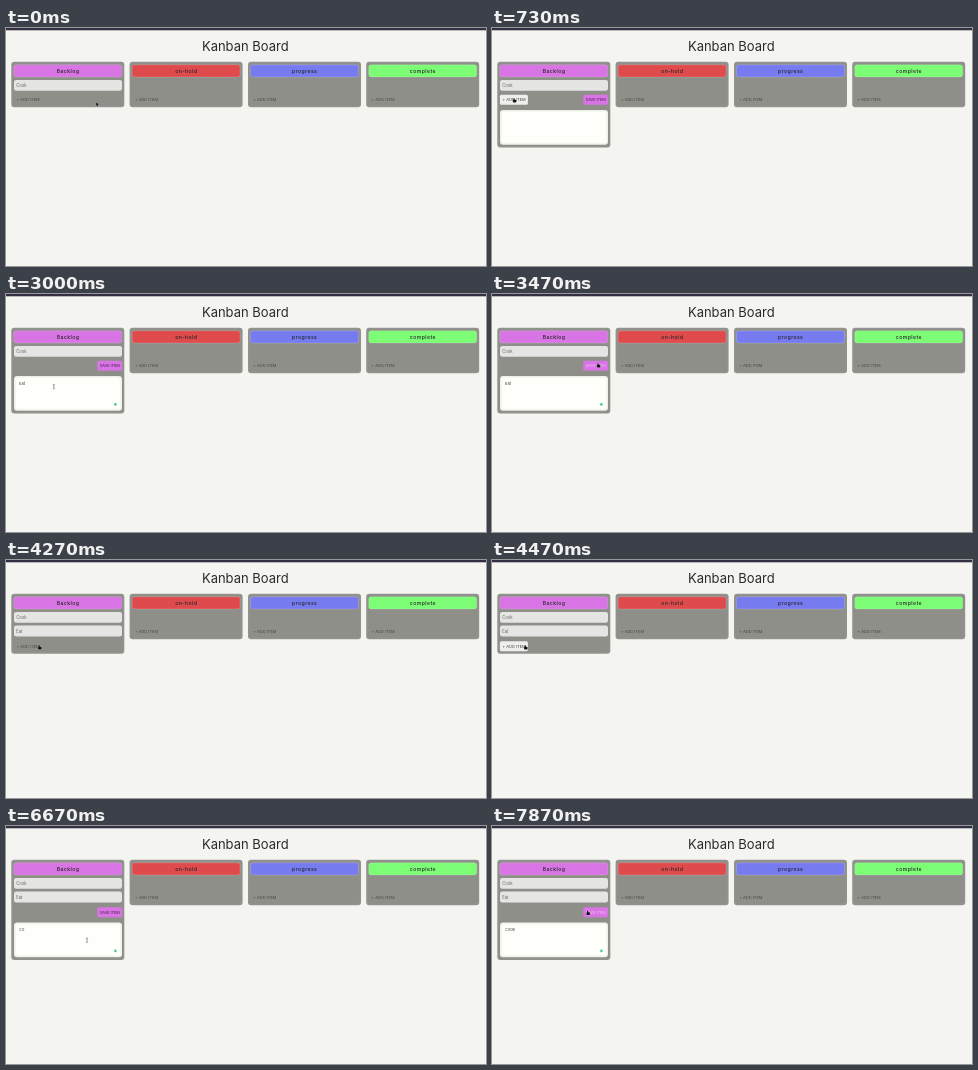
Recreate the animation shown at these times as an HTML page with a canvas. Size 480x238 px, loop 8000 ms.

```html
<!DOCTYPE html>
<html lang="en">
<head>
<meta charset="utf-8">
<title>Kanban Board</title>
<style>
  html, body { margin: 0; width: 100%; height: 100%; overflow: hidden; background: #f4f5f0; }
  canvas { display: block; }
</style>
</head>
<body>
<canvas id="stage" width="480" height="238"></canvas>
<script>
const ctx = document.getElementById('stage').getContext('2d');
const LOOP = 8000;
const VIOLET = '#d974e4';
const columns = [
  { x: 5.3, name: 'Backlog', color: VIOLET },
  { x: 123.6, name: 'on-hold', color: '#df4b4c' },
  { x: 242, name: 'progress', color: '#777bf0' },
  { x: 360.2, name: 'complete', color: '#7dfc76' }
];

// Cursor stops: time, x, y; the pointer eases between neighbours.
const path = [
  [70, 90.2, 74.2], [430, 22, 71], [900, 22, 71], [1200, 47, 93],
  [2980, 47, 93], [3270, 106, 70], [3900, 106, 70], [4200, 33.2, 86],
  [5130, 33.2, 86], [5200, 72, 104], [5270, 72, 104], [5530, 81, 114],
  [7320, 81, 114], [7740, 95.6, 85.5]
];
const typing = [
  { text: 'Eat', keys: [1870, 2130, 2400] },
  { text: 'Code', keys: [5800, 6600, 6700, 6800] }
];

const clamp = v => Math.max(0, Math.min(1, v));
const ramp = (t, from, to) => clamp((t - from) / (to - from));
const ease = v => v * v * (3 - 2 * v);
const within = (t, from, to) => t >= from && t < to;

function box(x, y, w, h, r, fill) {
  ctx.beginPath();
  ctx.roundRect(x, y, w, h, r);
  ctx.fillStyle = fill;
  ctx.fill();
}

function label(text, x, y, size, color, align = 'left', weight = 400, spacing = 0) {
  ctx.font = `${weight} ${size}px Inter, sans-serif`;
  ctx.letterSpacing = spacing + 'px';
  ctx.textAlign = align;
  ctx.textBaseline = 'alphabetic';
  ctx.fillStyle = color;
  ctx.fillText(text, x, y);
}

function item(text, y) {
  box(8, y, 108, 10.8, 2.2, '#e5e5e3');
  label(text, 10.2, y + 6.9, 4.2, '#666664');
}

function addButton(x, y, hover = 0, alpha = 1) {
  ctx.globalAlpha = alpha * hover;
  box(x + 2.6, y - 5, 28, 10, 1.5, '#eeeeec');
  ctx.globalAlpha = alpha;
  label('+ ADD ITEM', x + 5.3, y + 1.4, 4, '#484846');
  ctx.globalAlpha = 1;
}

function saveButton(y, hover) {
  box(91.3, y - 5, 24.8, 10, 1.5, VIOLET);
  const mix = (a, b) => Math.round(a + (b - a) * hover);
  label('SAVE ITEM', 103.7, y + 1.4, 3.8, `rgb(${mix(70, 240)},${mix(30, 190)},${mix(76, 244)})`, 'center');
}

function editor(y, text, badge) {
  box(8, y, 108, 34.8, 3, '#f0f0eb');
  box(9, y + 1, 106, 32.8, 3, '#f7f7f2');
  box(10, y + 2, 104, 30.8, 2.5, '#fefefa');
  label(text, 13, y + 8.8, 4, '#444442');
  if (badge) {
    ctx.beginPath();
    ctx.arc(109.4, y + 28.4, 1.3, 0, Math.PI * 2);
    ctx.fillStyle = '#3bcf91';
    ctx.fill();
  }
}

function column({ x, name, color }, height) {
  box(x, 33.8, 113, height, 3, '#92928f');
  box(x + 1.5, 35.3, 110, height - 3, 2.5, '#8f8f8a');
  box(x + 2.5, 36.8, 108, 12.2, 2.5, color);
  ctx.strokeStyle = 'rgba(255,255,255,.22)';
  ctx.lineWidth = .7;
  ctx.stroke();
  label(name, x + 56.7, 44.7, 5.2, '#252527', 'center', 500, .4);
}

function cursorAt(t) {
  const next = path.findIndex(stop => stop[0] > t);
  if (next === 0) return path[0].slice(1);
  if (next < 0) return path[path.length - 1].slice(1);
  const [t0, x0, y0] = path[next - 1];
  const [t1, x1, y1] = path[next];
  const k = ease(ramp(t, t0, t1));
  return [x0 + (x1 - x0) * k, y0 + (y1 - y0) * k];
}

function cursor(t) {
  const [x, y] = cursorAt(t);
  const overText = within(t, 1130, 3050) || within(t, 5270, 7450);
  const overButton = within(t, 370, 960) || within(t, 3200, 3670) ||
    within(t, 4170, 5190) || t >= 7700;
  ctx.save();
  ctx.translate(x, y);
  if (overText) {
    ctx.fillStyle = '#777';
    ctx.fillRect(-.4, -2, .8, 4.2);
    ctx.fillRect(-1.1, -2.2, 2.2, .5);
    ctx.fillRect(-1.1, 2, 2.2, .5);
  } else {
    ctx.beginPath();
    if (overButton) {
      ctx.roundRect(-.6, -.7, 1.3, 3, .6);
      ctx.roundRect(-1.2, .8, 3.6, 2.7, 1);
    } else {
      [[0, 0], [0, 3.8], [.9, 3], [1.5, 4.3], [2.1, 4], [1.6, 2.7], [2.7, 2.6]]
        .forEach(p => ctx.lineTo(...p));
      ctx.closePath();
    }
    ctx.strokeStyle = 'rgba(255,255,255,.45)';
    ctx.lineWidth = .6;
    ctx.stroke();
    ctx.fillStyle = '#151515';
    ctx.fill();
  }
  ctx.restore();
}

function backlog(t) {
  const second = t >= 3670;
  const opened = second ? 4530 : 660;
  const open = t >= opened;
  const shift = second ? 14.5 : 0;
  const buttonY = 71.8 + shift;
  column(columns[0], (open ? 85.7 : 45.5) + shift);
  item('Cook', 52);
  if (second) item('Eat', 65.6);

  const hover = second ? ramp(t, 4280, 4450) : ramp(t, 390, 540);
  const alpha = second ? 1 - ramp(t, 4670, 4810) : 1 - ramp(t, 920, 1100);
  if (alpha > 0) addButton(columns[0].x, buttonY, hover, alpha);

  if (open) {
    saveButton(buttonY, second ? ramp(t, 7700, 7860) : ramp(t, 3230, 3460));
    const { text, keys } = typing[+second];
    editor(82 + shift, text.slice(0, keys.filter(k => t >= k).length), t >= opened + 140);
  }
}

function draw(t) {
  ctx.fillStyle = '#f4f5f0';
  ctx.fillRect(0, 0, 480, 238);
  ctx.fillStyle = '#352f44';
  ctx.fillRect(0, 0, 480, 2.3);
  label('Kanban Board', 239.3, 22.6, 13, '#2b2b2b', 'center');
  columns.slice(1).forEach(c => {
    column(c, 45.5);
    addButton(c.x, 71.8);
  });
  backlog(t);
  cursor(t);
}

const start = performance.now();
function tick() {
  draw((performance.now() - start) % LOOP);
  requestAnimationFrame(tick);
}
tick();
</script>
</body>
</html>
```
